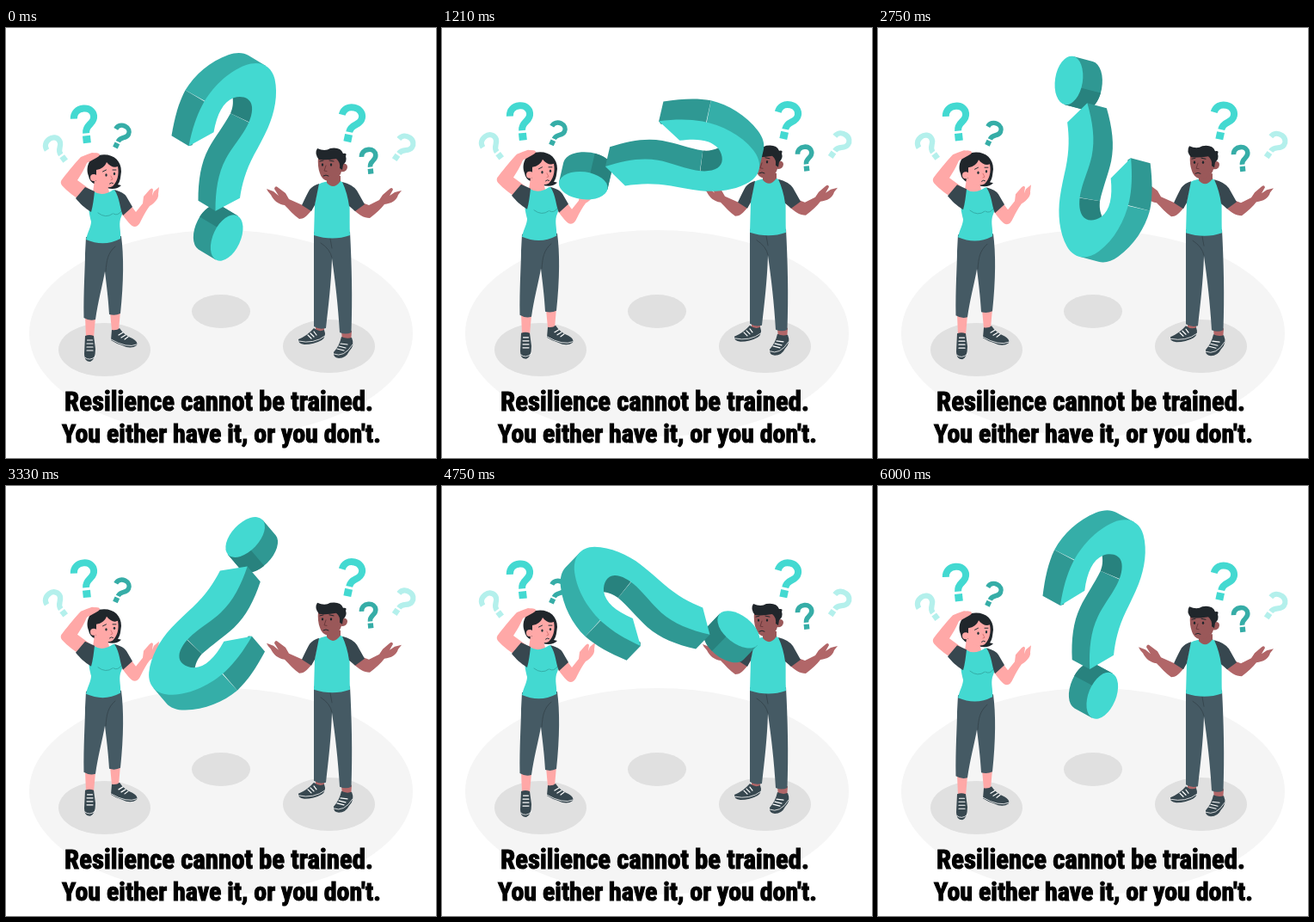
Recreate the animation shown at these times as an HTML page. Size 500x500 px, loop 6040 ms.

```html
<!DOCTYPE html>
<html lang="en">
<head>
<meta charset="utf-8">
<title>Resilience</title>
<style>
  html, body { margin: 0; width: 100%; height: 100%; overflow: hidden; background: #fff; }
  svg { display: block; width: 100vw; height: 100vh; }
  .teal { fill: #43d9d1; }
  .side { fill: #2f9893; }
  .mid { fill: #35aea8; }
  .deep { fill: #28827e; }
  .pants { fill: #455a64; }
  .sleeve, .shoe { fill: #37474f; }
  .hair { fill: #20262b; }
  .pink { fill: #ffa8a7; }
  .brown { fill: #b16668; }
  .face { fill: #9a5859; }
  .line { fill: none; stroke-linecap: round; stroke-linejoin: round; }
  .lace { stroke: #fff; stroke-width: 1.2; }
  .fold { stroke: #37474f; stroke-width: 1; }
  .ask path { fill: none; stroke: currentColor; stroke-width: 8; }
  .ask rect { fill: currentColor; }
  .caption {
    font: 900 29px Impact, "Roboto Condensed", "Open Sans Condensed", "Open Sans", "Noto Sans", sans-serif;
    font-stretch: 75%;
    text-anchor: middle;
    stroke: #000;
    stroke-width: 1.1;
  }
</style>
</head>
<body>
<svg viewBox="0 0 500 500">
  <ellipse cx="250" cy="355" rx="223" ry="120" fill="#f5f5f5"/>
  <g fill="#e0e0e0">
    <ellipse cx="114.5" cy="374" rx="53.5" ry="31"/>
    <ellipse cx="375.5" cy="370" rx="53.5" ry="31"/>
    <ellipse cx="250" cy="329.5" rx="34" ry="19.5"/>
  </g>

  <g id="float">
    <g id="asks"></g>

    <!-- woman -->
    <g>
      <path class="pink" d="M92 335L104 337L102 360L93 360ZM121 330L133 329L131 352L123 352Z"/>
      <path class="shoe" d="M92 358Q97 356 102 358L104 373Q104 386 98 388Q91 388 91 379ZM123 351Q129 352 132 349Q137 357 147 361Q154 365 152 369Q145 374 135 369Q128 367 122 363Z"/>
      <path class="line lace" d="M94.500 363h6M94 367h7M94 371h7M94 375h7M131 357l5-3M134 360l5-3M138 362l4-3"/>
      <path class="line" stroke="#fff" stroke-width=".8" d="M91.500 383Q97 388 104 382M122 362Q141 373 152 368"/>
      <path class="pants" d="M93 243L134 242C137 264 137 295 133 332Q127 335 120 333C119 315 117 300 115 283C112 300 107 318 104 339Q97 341 90.500 337C90 305 92 280 92 262Z"/>
      <path class="line fold" d="M116 283C117 270 118 262 127 254"/>
      <path class="pink" d="M91 203C81 197 71 190 65 183Q62 179 66 175C73 166 81 156 87 150Q94 147 100 145L108 146Q110 149 105 151C100 153 97 155 94 157C91 164 87 171 83 177L98 188Z"/>
      <path class="pink" d="M134 215C140 223 145 231 150 231Q154 231 157 224C160 218 163 212 167 207C174 203 178 197 177 193L178 185L172 190L170 195L171 188Q170 185 167 188L160 196L159 204L151 214L145 206Z"/>
      <path class="hair" d="M96 172C92 162 97 150 108 148C123 145 134 153 134 167C133 174 133 178 130 182L134 183Q128 189 117 186L104 182Q97 179 96 172Z"/>
      <path class="pink" d="M103 177L118 182L120 191Q111 199 101 191Z"/>
      <path class="teal" d="M102 190Q112 197 125 188L133 191C138 204 137 213 133 222C131 230 134 237 133 245Q114 255 93 246C95 237 99 231 99 225C97 218 96 212 96 202Z"/>
      <path class="line" stroke="#35aea8" d="M107 215Q116 222 124 216M125 216Q130 219 134 213"/>
      <path class="sleeve" d="M92 185L103 190C102 199 101 207 99 214C91 209 86 204 81 198ZM126 188Q137 191 140 196L147 208L136 218C132 209 133 199 126 188Z"/>
      <circle class="pink" cx="102" cy="174" r="4"/>
      <path class="pink" d="M105 165C111 164 115 161 117 156C121 161 126 163 130 161C132 171 129 179 124 184C118 187 109 184 105 179Z"/>
      <g fill="#263238"><ellipse cx="116.500" cy="171" rx="1.200" ry="1.700"/><ellipse cx="126" cy="169.500" rx="1.200" ry="1.700"/></g>
      <path class="line" stroke="#263238" d="M112.500 167l4-2M124 165l4 0M120.500 181q2-2 4-.5"/>
      <path class="line" stroke="#d97777" d="M122 172l2 4-2 .7"/>
      <path class="pink" d="M96 148Q103 144 108 146Q111 148 105 151L96 156Z"/>
    </g>

    <!-- man -->
    <g>
      <path class="brown" d="M360 344H371L369 357L360 356ZM390 352H402L401 366L391 364Z"/>
      <path class="shoe" d="M358 349Q364 354 370 351Q373 359 367 363Q358 368 347 368Q339 367 340 362Q350 358 358 349ZM390 359Q396 362 402 360Q406 369 399 376Q395 384 387 384Q380 383 381 377Q388 369 390 359Z"/>
      <path class="line lace" d="M354 355l4 4M351 357l4 4M358 353l3 4M389 367l8 1M387 370l8 2M385 373l8 2"/>
      <path class="line" stroke="#fff" stroke-width=".8" d="M340 364Q358 368 371 358M381 379Q393 384 403 368"/>
      <path class="pants" d="M358 237H400C402 275 403 315 401.500 354Q395 357 388 354C386 322 383 296 379 268C378 298 375 322 372 349Q364 351 358 347C358 310 358 276 358 237Z"/>
      <path class="line fold" d="M379 267Q377 257 366 250M379 256L377 245"/>
      <path class="brown" d="M356 211C350 219 346 222 341 222C335 218 329 211 324 206C316 205 311 200 308 194Q304 190 303 187L311 190L317 195L312 187Q313 182 317 186L325 192L329 199L347 207Z"/>
      <path class="brown" d="M404 211C410 217 416 221 423 221C430 216 436 210 440 205C448 204 454 201 456 194L460 189L452 191L446 195L450 188Q449 184 445 188L438 194L434 200L422 206L414 203Z"/>
      <path class="teal" d="M363 182Q372 177 389 178L397 183C401 199 399 221 400 241Q380 248 358 241L359 205Z"/>
      <path class="sleeve" d="M364 181L359 206L355 213L344 206Q350 193 353 188Q357 183 364 181ZM391 179Q403 182 408 189L417 205L406 213L399 207Q397 192 391 179Z"/>
      <path class="face" d="M373 172H389V178Q381 189 373 180Z"/>
      <path class="face" d="M363 150Q374 145 387 148L391 158Q397 157 397 162Q396 168 390 167C388 175 381 178 374 178Q367 176 365 169Q362 161 363 150Z"/>
      <path class="hair" d="M364 153Q358 146 362 140Q371 144 377 140Q389 138 392 146Q397 145 395 149Q397 155 392 159L391 165L388 163Q389 156 384 152Q373 154 364 153Z"/>
      <g fill="#20262b"><ellipse cx="368" cy="159" rx="1.200" ry="1.700"/><ellipse cx="378" cy="159" rx="1.200" ry="1.700"/></g>
      <path class="line" stroke="#20262b" d="M365 155l4-1M376 154l5 1M369 172q3-2 6 0"/>
      <path class="line" stroke="#6b393b" d="M372 160l-2 6 3 .5"/>
    </g>
  </g>

  <g id="mark">
    <path class="side" d="M243.800 269.400L223.800 257.400A28.500 16 -65 0 1 249.600 206.600L269.600 218.600Z"/>
    <path class="deep" d="M225.200 219.600A28.500 16 -65 0 1 249.600 206.600L269.600 218.600L256 240L245.200 231.600Z"/>
    <ellipse class="teal" rx="28.500" ry="16" transform="translate(256.700 244) rotate(-65)"/>
    <g transform="translate(-.5 -.8)">
      <path class="mid" d="M209 73C220 55 238 39.500 259 32C268.500 28.700 276.500 29 282.600 32.700L302.600 44.700L279 60L236 88Z"/>
      <path class="side" d="M193 126C196.500 105 201 88 209 73L231 86L235 89L217 137L213 138Z"/>
      <path class="side" d="M224 201.500C224 178 227 158 236 141C243 128 254 114 261.500 100L284 111L260 155L248 211L244 213.500Z"/>
      <path class="deep" d="M261.500 100C264 94 265 89 264 81L275 76L292 88L285 111Z"/>
      <path class="teal" d="M213 138C217 118 222 103 229 90C240 70 258 52 279 44C296 38 309 44 313 60C317 78 313 99 305 117C300 128 294 139 289 148C279 167 275 182 272.500 198.500L244 213.500C244 190 247 170 256 153C263 140 272 130 279 118C285 108 288 97 286 90C284 82 275 79 265 82C253 87 246 100 242 122Z"/>
    </g>
  </g>

  <text class="caption" x="247.500" data-mid="434" data-fit="359">Resilience cannot be trained.</text>
  <text class="caption" x="250.500" data-mid="471.500" data-fit="371">You either have it, or you don't.</text>
</svg>
<script>
const LOOP = 6040, FRAMES = 145, BOBS = 4, LIFT = 10, LEAD = 0.02;
const $ = id => document.getElementById(id);

// small question marks: x, y, tilt, scale, colour
const asks = [
  [91, 111.5, -6, 1, '#43d9d1'],
  [132.8, 125, 25, .68, '#36ada7'],
  [58, 141, -37, .78, '#b4f0ec'],
  [400.5, 110, 12, 1, '#43d9d1'],
  [422, 154, -6, .7, '#36ada7'],
  [461, 138.5, 35, .77, '#b4f0ec']
];
$('asks').innerHTML = asks.map(([x, y, tilt, scale, color]) =>
  `<g class="ask" color="${color}" transform="translate(${x} ${y}) rotate(${tilt}) scale(${scale})">
    <path d="M-11.500 -7C-11 -14 -6 -18 1 -18C8 -18 12 -13 12 -8C12 2 1 0 1 11"/>
    <rect x="-3.500" y="14" width="9" height="8.500"/></g>`).join('');

// pick the type size at which a line fills its measure
for (const line of document.querySelectorAll('.caption')) {
  const size = Math.min(33, 29 * line.dataset.fit / line.getComputedTextLength());
  line.style.fontSize = size + 'px';
  line.setAttribute('y', +line.dataset.mid + size * .36);
}

function draw(ms) {
  const tick = Math.floor(ms % LOOP / 10) * 10;
  const p = Math.floor((tick + 4.9) * 24 / 1000) / FRAMES;
  const bob = (p * BOBS + LEAD) % 1;
  const lift = LIFT * (1 - Math.abs(2 * bob - 1) - 2 * LEAD);
  $('mark').setAttribute('transform', `rotate(${360 * p} 252.3 150)`);
  $('float').setAttribute('transform', `translate(0 ${-lift})`);
}

const start = performance.now();
function loop() {
  draw(performance.now() - start);
  requestAnimationFrame(loop);
}
loop();
</script>
</body>
</html>
```
